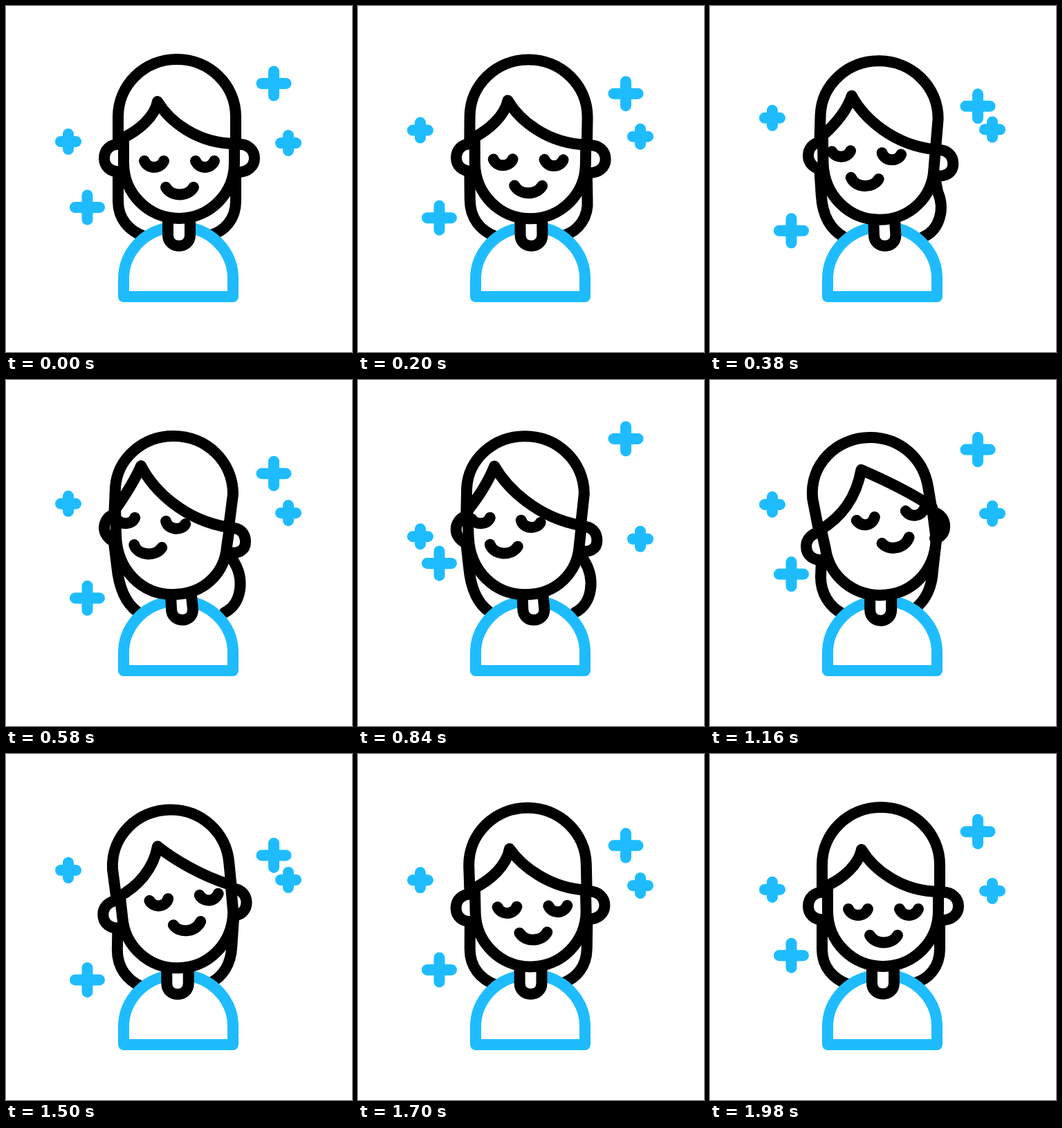
An HTML page for the animation above (2 s loop, 500 px wide and 500 px high).

```html
<!DOCTYPE html>
<html lang="en">
<head>
<meta charset="utf-8">
<title>Calm face</title>
<style>
html, body { margin: 0; height: 100%; overflow: hidden; background: #fff; }
svg { display: block; width: 100vw; height: 100vh; }
path { fill: none; stroke: #000; stroke-width: 16; stroke-linecap: round; stroke-linejoin: round; }
.blue { stroke: #1ebcff; }
</style>
</head>
<body>
<svg viewBox="0 0 500 500"></svg>
<script>
const svg = document.querySelector('svg');
const LOOP = 2000;

function addPath(d, className = '') {
  const path = document.createElementNS('http://www.w3.org/2000/svg', 'path');
  path.setAttribute('d', d);
  path.setAttribute('class', className);
  return svg.appendChild(path);
}

function ease(t, from, to) {
  const p = Math.min(1, Math.max(0, (t - from) / (to - from)));
  return p * p * (3 - 2 * p);
}

// Each part has three poses: facing ahead, turned left, turned right.
const numbers = d => d.match(/\d+/g).map(Number);
function addPart(ahead, left, right) {
  return { path: addPath(ahead), shape: ahead, poses: [ahead, left, right].map(numbers) };
}

const locks = [
  addPart('M162 240L162 282C162 308 178 325 200 333',
          'M156 235L160 268C163 300 172 322 190 335',
          'M161 262L160 285C160 308 172 328 192 338'),
  addPart('M332 240L332 282C332 308 316 325 296 331',
          'M320 252L327 259C346 286 341 324 316 336',
          'M327 232L322 275C320 303 309 320 295 331')
];

addPath('M227 322A79 75 0 0 0 170 394V420H328V394A79 75 0 0 0 273 322', 'blue');

const neck = addPart('M234 310L234 331C234 352 266 352 266 331L266 310',
                     'M238 310L239 331C239 352 271 352 270 331L268 312',
                     'M231 310L231 332C231 353 262 353 262 332L262 312');

const hair = addPart('M162 196L162 160C162 114 200 77 247 77C294 77 332 114 332 160L332 196',
                     'M156 200L158 155C161 114 197 81 242 81C290 81 328 118 328 165L322 212',
                     'M158 222L148 172C143 122 183 83 231 83C274 83 308 113 315 155L321 190');

const fringe = addPart('M168 191C192 180 215 160 219 138C235 165 275 199 332 199',
                       'M160 184C173 165 186 145 195 124C213 159 257 203 322 213',
                       'M158 218C190 200 212 170 219 130C246 141 285 158 320 182');

const face = addPart('M170 190L170 227C170 271 206 307 250 307C294 307 330 271 330 227L330 198',
                     'M158 186L159 226C161 275 196 310 241 310C286 310 316 279 319 241L323 213',
                     'M161 218L167 244C173 285 208 311 246 311C293 311 325 275 327 230L321 184');

const ears = [
  addPart('M167 200C150 198 142 209 142 220C142 231 150 241 167 239',
          'M157 194C146 197 142 206 142 214C142 222 148 230 157 234',
          'M160 220C145 223 139 232 139 241C139 254 150 263 166 260'),
  addPart('M333 200C350 198 359 209 359 220C359 231 350 241 333 240',
          'M322 214C338 212 346 222 346 234C346 246 336 252 320 249',
          'M322 190C334 193 339 202 339 211C339 220 333 228 325 228')
];

const eyes = [
  addPart('M200 224C205 236 223 236 228 224',
          'M160 201C165 209 182 210 186 199',
          'M213 203C220 213 236 211 239 198'),
  addPart('M274 224C279 236 296 236 301 224',
          'M231 204C234 217 254 218 259 208',
          'M284 189C291 199 306 197 311 185')
];

const mouth = addPart('M231 262C239 276 263 276 271 262',
                      'M185 238C190 254 216 256 225 242',
                      'M250 236C260 247 283 244 289 227');

const parts = [...locks, neck, hair, fringe, face, ...ears, ...eyes, mouth];

// Sparkles swing from rest to `first`, to `second`, back to `first`, then rest.
const BIG_TIMES = [0, 450, 960, 1460, 2000];
const SMALL_TIMES = [0, 420, 900, 1300, 2000];
const sparkles = [
  { x: 387, y: 112, arm: 17.5, first: 35, second: -37, times: BIG_TIMES },
  { x: 117.5, y: 291, arm: 17.5, first: 36, second: -36, times: BIG_TIMES },
  { x: 90, y: 196, arm: 11, first: -35, second: 33, times: SMALL_TIMES },
  { x: 408, y: 198, arm: 11, first: -20, second: 34, times: SMALL_TIMES }
];
for (const s of sparkles) {
  s.path = addPath(`M${-s.arm} 0H${s.arm}M0 ${-s.arm}V${s.arm}`, 'blue');
}

function draw(now) {
  const t = now % LOOP;
  const swing = ease(t, 760, 1200);
  const left = ease(t, 100, 600) - swing;
  const right = swing - ease(t, 1220, 1840);

  for (const { path, shape, poses: [a, l, r] } of parts) {
    let i = 0;
    path.setAttribute('d', shape.replace(/\d+/g, () => {
      const value = a[i] + left * (l[i] - a[i]) + right * (r[i] - a[i]);
      i++;
      return value.toFixed(2);
    }));
  }

  for (const { path, x, y, first, second, times } of sparkles) {
    const stops = [0, first, second, first, 0];
    let dy = 0;
    for (let k = 1; k < stops.length; k++) {
      dy += (stops[k] - stops[k - 1]) * ease(t, times[k - 1], times[k]);
    }
    path.setAttribute('transform', `translate(${x} ${y + dy})`);
  }
}

function tick() {
  draw(performance.now());
  requestAnimationFrame(tick);
}
tick();
</script>
</body>
</html>
```
